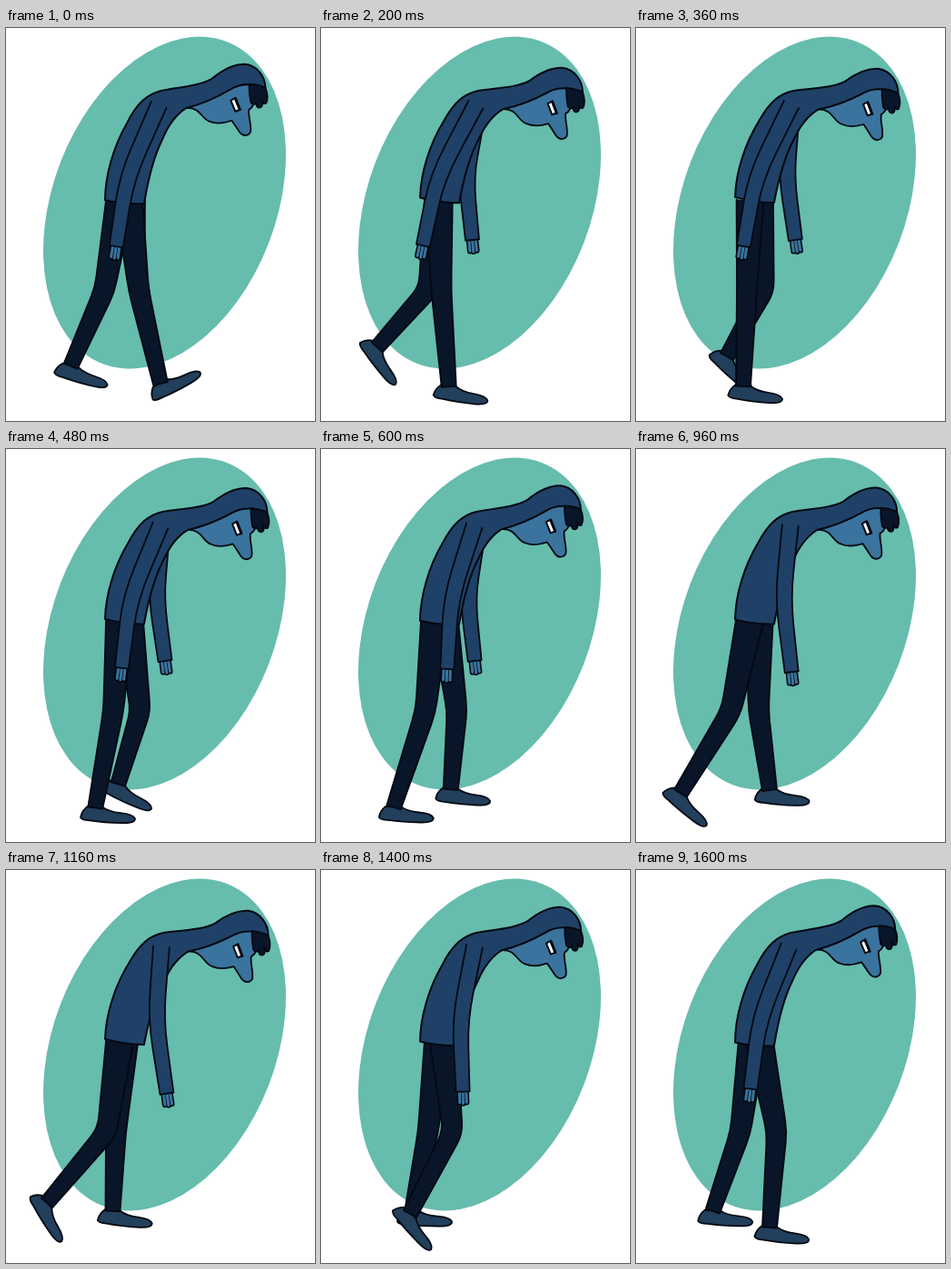
An HTML page with a canvas that plays this animation: 340 px wide and 432 px high, repeating every 1680 ms.

```html
<!DOCTYPE html>
<html lang="en">
<head>
<meta charset="utf-8">
<title>Gloomy walk</title>
<style>
html, body { margin: 0; width: 100%; height: 100%; overflow: hidden; background: #fff; }
canvas { display: block; }
</style>
</head>
<body>
<canvas id="stage" width="340" height="432"></canvas>
<script>
const ctx = document.getElementById('stage').getContext('2d');
const LOOP = 1680, STEP = 40, LAST = 1600, CYCLE = 1640;
const INK = '#040912', HOODIE = '#1f4167', SKIN = '#3a739d', SHOE = '#223f5b', PANTS = '#091529';

// One stride shared by both legs: knee x, ankle x, ankle height, foot angle
const stride = [
  [146, 170, -3, -30], // heel strike
  [138, 152, 0, 2],    // plant
  [122, 118, 0, 4],    // pass under
  [115, 80, 0, 1],     // push
  [105, 58, -7, 23],   // heel lift
  [111, 45, -28, 55],  // toe off
  [145, 98, -16, 45],  // swing
  [155, 147, -1, 3]    // reach
];
const nearLeg = { times: [0, 120, 360, 600, 840, 1160, 1400, 1600], ground: 394, reach: 1, shift: 0 };
const farLeg = { times: [840, 960, 1160, 1600, 1660, 1790, 2000, 2240], ground: 375, reach: 0.87, shift: 5 };

const torso = new Path2D('M198 88C184 97 177 110 172 122C162 142 156 168 152 193Q130 194 109 189C109 162 118 130 133 104C144 82 155 73 170 69C190 65 212 64 226 56C238 46 250 40 262 40C276 41 285 54 285 66Q262 58 246 68Q222 82 198 88Z');
const face = new Path2D('M198 88C214 87 214 100 224 103Q234 107 248 102C251 106 255 112 257 115C262 121 270 118 269 111C269 104 266 96 267 90Q272 87 272 82L271 62Q257 60 246 68Q222 82 198 88Z');
const hair = new Path2D('M267 62Q276 62 285 66Q289 76 286 83Q283 85 281 80Q283 87 279 88Q275 88 275 83Q272 86 269 82Q267 72 267 62Z');
const eye = new Path2D('M247 80L252 77L257 90L252 92Z');
const shoe = new Path2D('M-9 -1Q-15 4 -16 11Q-14 14 -6 14Q10 16 30 16Q44 16 44 11Q42 6 28 5Q15 4 8 -1Z');

const clamp = (v, lo, hi) => Math.max(lo, Math.min(hi, v));
const mix = (p, q, u) => [p[0] + (q[0] - p[0]) * u, p[1] + (q[1] - p[1]) * u];

// Periodic cubic through the stride poses
function pose(times, t) {
  const n = times.length;
  if (t < times[0]) t += CYCLE;
  let i = n - 1;
  while (times[i] > t) i--;
  const around = [i - 1, i, i + 1, i + 2];
  const [ta, tb, tc, td] = around.map(j => times[(j + n) % n] + CYCLE * Math.floor(j / n));
  const [a, b, c, d] = around.map(j => stride[(j + n) % n]);
  const span = tc - tb, u = (t - tb) / span;
  return b.map((v, k) => {
    const m0 = (c[k] - a[k]) / (tc - ta) * span;
    const m1 = (d[k] - v) / (td - tb) * span;
    const gap = c[k] - v;
    return v + u * (m0 + u * (3 * gap - 2 * m0 - m1 + u * (m0 + m1 - 2 * gap)));
  });
}

// Eases 0 to 1 between the times low and high, then back over the rest of the cycle
function swing(t, low, high) {
  const rise = (high - low + CYCLE) % CYCLE, since = (t - low + CYCLE) % CYCLE;
  const turn = since < rise ? since / rise : 1 + (since - rise) / (CYCLE - rise);
  return (1 - Math.cos(Math.PI * turn)) / 2;
}

function paint(path, fill, width = 1.8) {
  ctx.fillStyle = fill;
  ctx.fill(path);
  ctx.strokeStyle = INK;
  ctx.lineWidth = width;
  ctx.stroke(path);
}

function offset(p, from, to, d) {
  const dx = to[0] - from[0], dy = to[1] - from[1], len = Math.hypot(dx, dy);
  return [p[0] - dy / len * d, p[1] + dx / len * d];
}

// Tapered two-bone limb, left open at the top
function limb(top, joint, end, widths, fill, bend) {
  const side = s => [
    offset(top, top, joint, s * widths[0]),
    offset(joint, top, end, s * widths[1]),
    offset(end, joint, end, s * widths[2])
  ];
  const path = new Path2D();
  for (const [a, b, c] of [side(1), side(-1).reverse()]) {
    path.lineTo(...a);
    path.lineTo(...mix(a, b, 1 - bend));
    path.quadraticCurveTo(...b, ...mix(b, c, bend));
    path.lineTo(...c);
  }
  paint(path, fill);
}

function drawLeg({ times, ground, reach, shift }, t) {
  const [kneeX, ankleX, lift, angle] = pose(times, t);
  const scaled = x => 114 + (x - 114) * reach;
  const knee = scaled(kneeX), ankle = [scaled(ankleX), ground + lift * reach];
  const hip = clamp(128 + (knee - 128) * 0.4 + shift, 125, 136);
  ctx.save();
  ctx.translate(...ankle);
  ctx.rotate(angle * reach * Math.PI / 180);
  paint(shoe, SHOE);
  ctx.restore();
  limb([hip, 189], [knee, 288], ankle, [15, 11, 8], PANTS, 0.12);
}

function drawArm(shoulder, elbow, wrist) {
  ctx.save();
  ctx.translate(...wrist);
  ctx.rotate(Math.atan2(elbow[0] - wrist[0], wrist[1] - elbow[1]));
  for (const [color, width] of [[INK, 6.2], [SKIN, 3]]) {
    ctx.strokeStyle = color;
    ctx.lineWidth = width;
    for (const f of [-1, 0, 1]) {
      ctx.beginPath();
      ctx.moveTo(f * 3.6, -2);
      ctx.lineTo(f * 3.8, 13 - Math.abs(f));
      ctx.stroke();
    }
  }
  ctx.restore();
  limb(shoulder, elbow, wrist, [9, 8.5, 7.5], HOODIE, 0.38);
}

function draw(t) {
  ctx.fillStyle = '#fff';
  ctx.fillRect(0, 0, 340, 432);
  ctx.fillStyle = '#66bcad';
  ctx.beginPath();
  ctx.ellipse(174.5, 192, 122.9, 189.8, 21.1 * Math.PI / 180, 0, 7);
  ctx.fill();

  // The upper body sinks forward once per step
  const bob = Math.cos(4 * Math.PI * (t - 320) / CYCLE);
  const dx = 2 + 2 * bob, dy = 2 + 3 * bob;

  const farHand = 118 + 58 * swing(t, 1260, 410);
  drawArm([170, 104], [43 + farHand * 0.7, 164], [farHand, 233]);
  drawLeg(farLeg, t);
  drawLeg(nearLeg, t);

  ctx.save();
  ctx.transform(1, dy / 95, -dx / 140, 1, dx * 190 / 140, -dy * 170 / 95);
  paint(face, SKIN);
  paint(torso, HOODIE, 2);
  paint(hair, PANTS);
  paint(eye, '#fff', 2);
  ctx.lineWidth = 3;
  ctx.beginPath();
  ctx.moveTo(252, 78);
  ctx.lineTo(257, 90);
  ctx.stroke();
  ctx.restore();

  const nearHand = 112 + 65 * swing(t, 160, 1150);
  drawArm([168 + dx * 0.75, 84], [64 + nearHand * 0.57, 164], [nearHand, 228 + nearHand * 0.1]);
}

ctx.lineCap = ctx.lineJoin = 'round';
function tick() {
  const t = performance.now() % LOOP;
  draw(Math.min(Math.floor(t / STEP) * STEP, LAST));
  requestAnimationFrame(tick);
}
tick();
</script>
</body>
</html>
```
